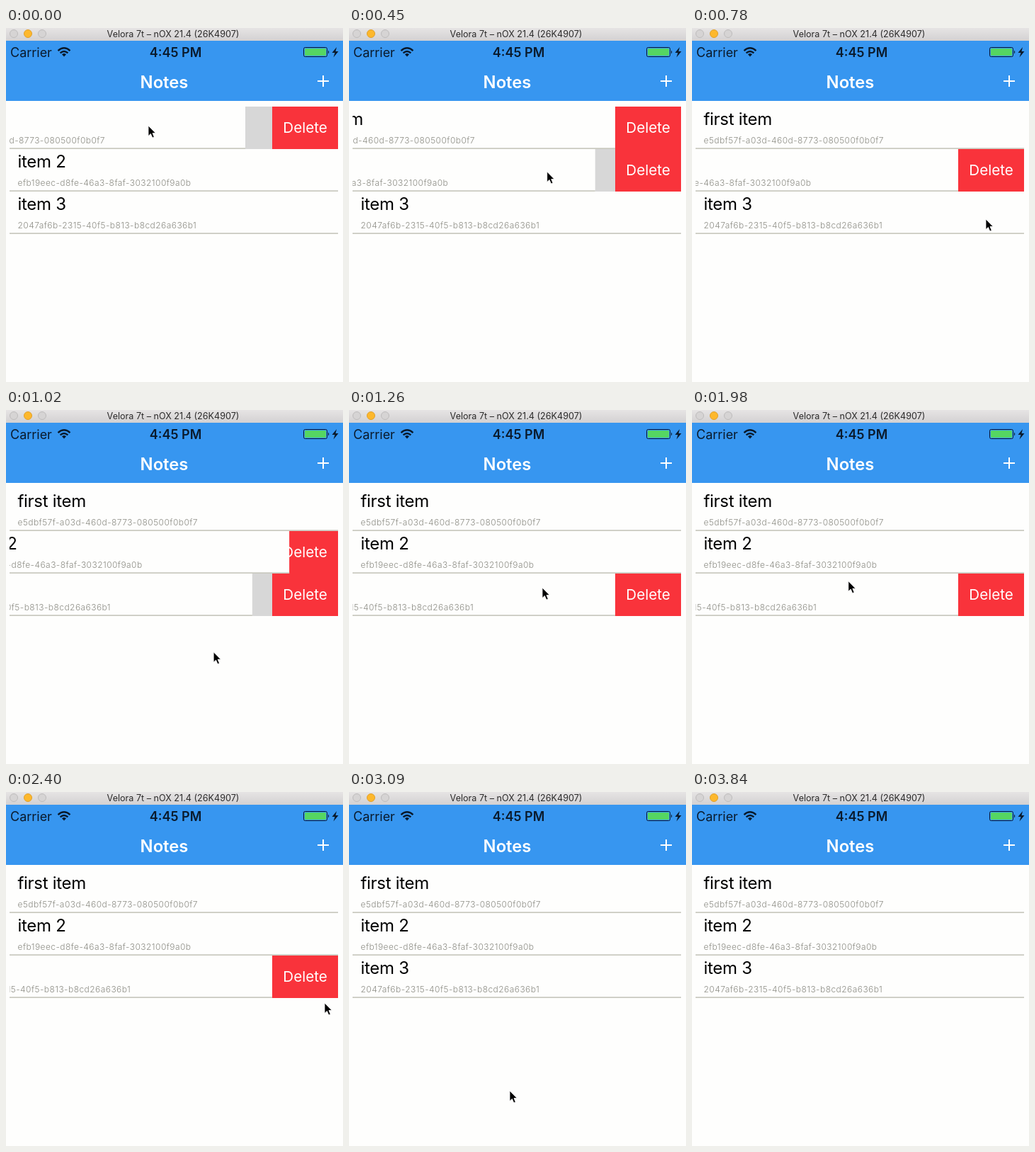
These frames come from a looping animation (476 px wide and 500 px high, 3.87 s). An HTML page:

```html
<!DOCTYPE html>
<html lang="en">
<head>
<meta charset="utf-8">
<title>Notes</title>
<style>
  html, body { margin: 0; width: 100%; height: 100%; overflow: hidden; background: #fefefd; }
  svg { display: block; font-family: Inter, Roboto, sans-serif; }
  .name { font-size: 24px; letter-spacing: -.3px; fill: #000; }
  .id { font-size: 12px; font-weight: 300; letter-spacing: .44px; fill: #8c8c84; }
  .status { font-size: 18px; fill: #0a1a2c; }
</style>
</head>
<body>
<svg width="476" height="500" viewBox="0 0 476 500">
  <defs>
    <linearGradient id="bar" x2="0" y2="1">
      <stop stop-color="#e6e4e4"/><stop offset="1" stop-color="#d3d1d2"/>
    </linearGradient>
  </defs>
  <rect width="476" height="500" fill="#fefefd"/>
  <rect width="476" height="18" fill="url(#bar)"/>
  <g fill="#d6d4d4" stroke="#bebcbc">
    <circle cx="11" cy="8" r="5.5"/>
    <circle cx="31" cy="8" r="5.5" fill="#fdb82c" stroke="#e0a02c"/>
    <circle cx="51" cy="8" r="5.5"/>
  </g>
  <text x="236" y="13" font-size="12.6" text-anchor="middle" fill="#2c2b2b">Velora 7t – nOX 21.4 (26K4907)</text>

  <rect y="18" width="476" height="85" fill="#3796f0"/>
  <text class="status" x="6" y="41">Carrier</text>
  <g fill="none" stroke="#0a1a2c" stroke-width="2.4">
    <path d="M73.5 32.2Q82 24.5 90.5 32.2M76.6 35.4Q82 30.4 87.4 35.4"/>
    <path d="M79 37.3Q82 34.6 85 37.3L82 40.5z" fill="#0a1a2c" stroke="none"/>
  </g>
  <text class="status" x="239.5" y="41" text-anchor="middle" font-weight="600">4:45 PM</text>
  <rect x="420.5" y="27.5" width="33" height="13" rx="2" fill="none" stroke="#0a1a2c"/>
  <rect x="422" y="29" width="30" height="10" rx="1" fill="#55d662"/>
  <path d="M455 31.5q2.5 2.5 0 5z" fill="#0a1a2c"/>
  <path d="M467 27l-6.5 8h4l-2 6.5 7-8.5h-4z" fill="#0a1a2c"/>
  <text x="223.5" y="85" font-size="23.8" font-weight="600" text-anchor="middle" fill="#fff">Notes</text>
  <path d="M440 75h16M448 67v16" stroke="#fff" stroke-width="2"/>

  <svg id="list" x="5" y="110" width="464" height="181"></svg>
  <path id="cursor" d="M0 0V14.5L3.4 11.4 5.8 17 8.3 16 6 10.5H10.3Z" stroke="#fff" stroke-width=".8"/>
</svg>
<script>
const LOOP = 3870, STEP = 30;
const DRAG = 180, SPRING = 180;      // durations of a swipe and of a snap
const PULL = 131, OPEN = 93;         // row offsets when dragged and when resting open
const PRESS = 1620, SCROLL = 2760;   // second row is tapped; last row closes

const items = [
  ['first item', 'e5dbf57f-a03d-460d-8773-080500f0b0f7'],
  ['item 2', 'efb19eec-d8fe-46a3-8faf-3032100f9a0b'],
  ['item 3', '2047af6b-2315-40f5-b813-b8cd26a636b1']
];

// Where and when each row is let go
const swipes = [
  { t: 0, x: 201, y: 138 },
  { t: 480, x: 270, y: 203 },
  { t: 960, x: 284, y: 270 }
];

// The pointer drags each row, then wanders over the list and leaves at the top
const stops = [
  ...swipes.flatMap(s => [{ t: s.t - DRAG, x: s.x + PULL, y: s.y }, s]),
  { t: 1110, x: 310, y: 474 },
  { t: 1260, x: 273, y: 251 },
  { t: PRESS, x: 39, y: 197 },
  { t: 2400, x: 450, y: 298 },
  { t: 2700, x: 340, y: 486 },
  { t: 3090, x: 227, y: 422 },
  { t: 3270, x: 225, y: 262 },
  { t: 3810, x: 170, y: 30 }
];

const list = document.getElementById('list');
const cursor = document.getElementById('cursor');

list.innerHTML = items.map(([name, id], i) => `
  <g transform="translate(0 ${i * 60})">
    <rect y="1" width="464" height="60" fill="#d7d7d7"/>
    <rect y="1" x="371" width="93" height="60" fill="#f9333b"/>
    <text x="417.5" y="38" font-size="20.6" text-anchor="middle" fill="#fff">Delete</text>
    <g class="front">
      <rect class="face" y="1" width="464" height="60"/>
      <text class="name" x="11.5" y="27">${name}</text>
      <text class="id" x="11.5" y="53.3">${id}</text>
      <rect y="59.5" width="464" height="1.2" fill="#b4b4a6"/>
    </g>
  </g>`).join('');
const fronts = list.querySelectorAll('.front');
const faces = list.querySelectorAll('.face');

function ease(p) {
  p = Math.min(1, Math.max(0, p));
  return p * p * (3 - 2 * p);
}

function rowShift(i, t) {
  const release = swipes[i].t;
  const closing = i + 1 < swipes.length ? swipes[i + 1].t : SCROLL;
  const pulled = PULL * ease((t - release + DRAG) / DRAG);
  const back = (PULL - OPEN) * ease((t - release) / SPRING);
  return (back - pulled) * (1 - ease((t - closing) / SPRING));
}

function pointer(t) {
  const next = Math.max(1, stops.findIndex(s => s.t > t));
  const a = stops[next - 1], b = stops[next];
  const p = ease((t - a.t) / (b.t - a.t));
  return [a.x + (b.x - a.x) * p, a.y + (b.y - a.y) * p];
}

function draw(now) {
  const t = Math.floor((now % LOOP) / STEP) * STEP;
  const shown = t < stops[stops.length - 1].t;
  fronts.forEach((front, i) => {
    const pressed = i === 1 && Math.abs(t - PRESS) < 90;
    front.setAttribute('transform', `translate(${rowShift(i, t)} 0)`);
    faces[i].setAttribute('fill', pressed ? '#d7d7d7' : '#fefefd');
  });
  cursor.setAttribute('visibility', shown ? 'visible' : 'hidden');
  if (shown) cursor.setAttribute('transform', `translate(${pointer(t)})`);
  requestAnimationFrame(draw);
}
draw(performance.now());
</script>
</body>
</html>
```
